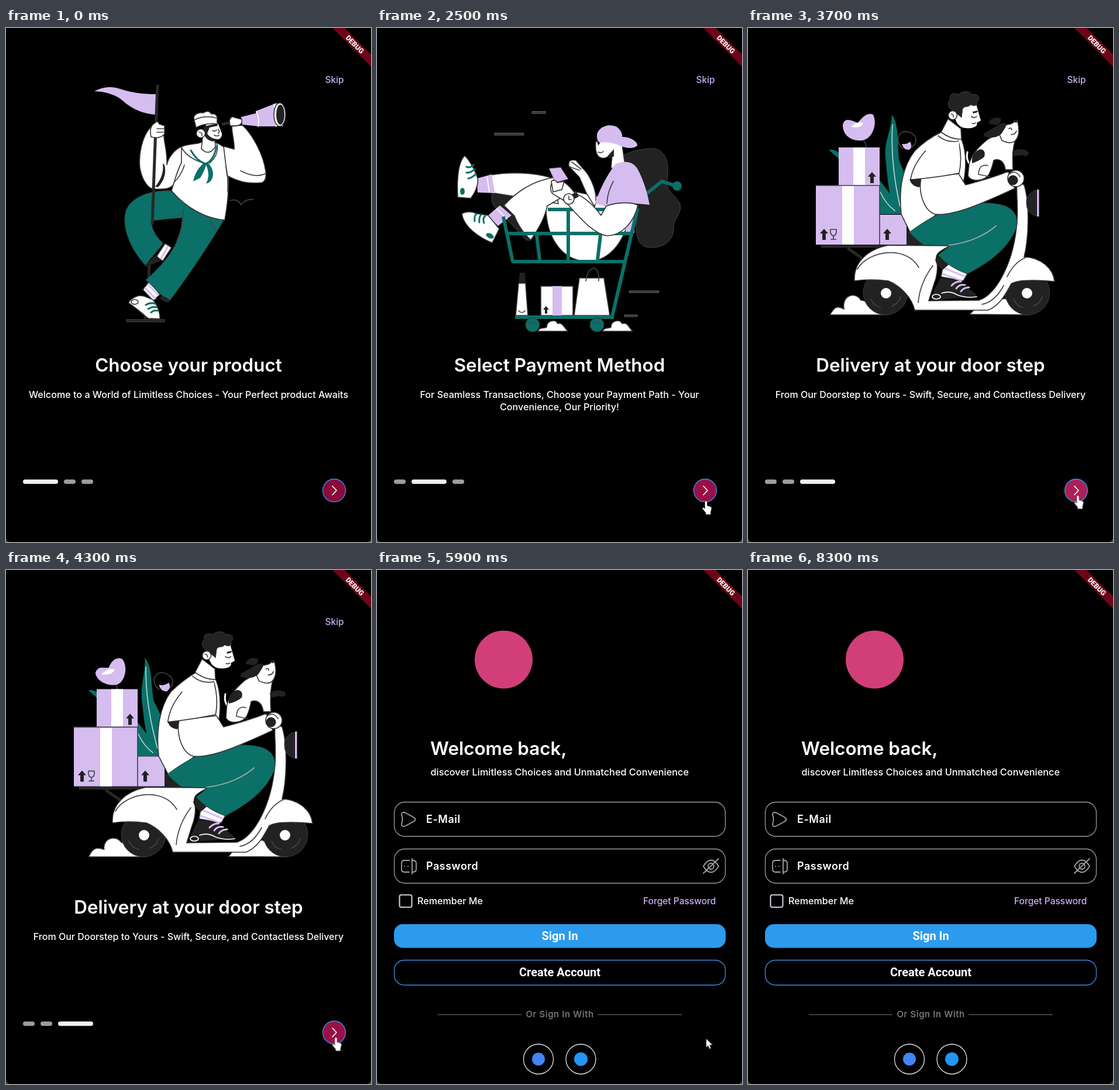
Recreate the animation shown at these times as an HTML page. Size 624 by 878 pixels, loop 8400 ms.

```html
<!DOCTYPE html>
<html lang="en">
<head>
<meta charset="utf-8">
<title>Shop onboarding</title>
<style>
html, body { margin: 0; height: 100%; overflow: hidden; background: #3a3a3a; }
svg { display: block; width: 624px; height: 878px; font-family: Inter, "Open Sans", sans-serif; }
text { fill: #fff; font-size: 16.15px; font-weight: 500; }
.mid { text-anchor: middle; }
.head { font-size: 31.4px; font-weight: 600; }
.roboto { font: 700 20px Roboto, sans-serif; }
.field { font-size: 18px; font-weight: 600; letter-spacing: .5px; }
.link { fill: #ccb0f4; font-size: 15.5px; }
.w { fill: #fff; stroke: #333; stroke-width: 1.6; }
.t { fill: #0a7068; }
.p { fill: #d6bdf0; }
.k { fill: #222; }
.l, .tl, .pl, .wl { fill: none; stroke: #444; stroke-width: 1.7; stroke-linecap: round; stroke-linejoin: round; }
.tl { stroke: #0a7068; stroke-width: 3; }
.pl { stroke: #d6bdf0; stroke-width: 3; }
.wl { stroke: #fff; }
.pole { stroke: #282828; stroke-width: 5; }
.frame { stroke: #0a7068; stroke-width: 6; fill: none; stroke-linejoin: round; }
.box { fill: none; stroke: #9b9b9b; stroke-width: 1.3; }
.icon { fill: none; stroke: #a2a2a2; stroke-width: 1.8; stroke-linecap: round; stroke-linejoin: round; }
.dot { fill: #9e9e9e; }
.on { fill: #f3f0f3; }

.scene, .hand, .arrow, .next { animation: 8.4s linear infinite; }
.scene { animation-timing-function: step-end; }
#find { animation-name: find; }
#pay { animation-name: pay; }
#ride { animation-name: ride; }
#tour { animation-name: tour; }
#login { animation-name: login; }
.hand { animation-name: hand; }
.arrow { animation-name: arrow; }
.next { fill: #8b0a3b; stroke: #2f96f0; stroke-width: 1.3; animation-name: press; }
@keyframes find { 0% { visibility: visible } 25%, 100% { visibility: hidden } }
@keyframes pay { 0% { visibility: hidden } 25% { visibility: visible } 41.667%, 100% { visibility: hidden } }
@keyframes ride { 0% { visibility: hidden } 41.667% { visibility: visible } 67.857%, 100% { visibility: hidden } }
@keyframes tour { 0% { visibility: visible } 67.857%, 100% { visibility: hidden } }
@keyframes login { 0% { visibility: hidden } 67.857%, 100% { visibility: visible } }
@keyframes hand {
  0%, 13% { transform: translate(630px, 798px) }
  17%, 22% { transform: translate(565px, 801.5px) }
  27%, 37% { transform: translate(556px, 808px) }
  41%, 100% { transform: translate(557.5px, 798.5px) }
}
@keyframes arrow {
  0%, 77% { transform: translate(562.5px, 800.5px) }
  82%, 100% { transform: translate(630px, 790px) }
}
@keyframes press {
  0%, 15% { fill: #8b0a3b }
  17%, 24% { fill: #9a1046 }
  25% { fill: #ab2058 }
  29%, 40.5% { fill: #9a1046 }
  42%, 45% { fill: #a92055 }
  49%, 100% { fill: #9a1046 }
}
</style>
</head>
<body>
<svg viewBox="0 0 624 878">
<rect y="-20" width="624" height="898" rx="8"/>

<g id="find" class="scene" data-at="0" data-half="1500">
  <path class="k" stroke="#4a4a4a" d="M206 498H271V502H206Z"/>
  <path class="pole" d="M238 470V498M245 400L244 436"/>
  <path class="p" d="M151 108C166 100 180 99 195 104C215 111 235 113 257 113L257 148C235 147 218 139 204 128C190 114 172 109 151 108Z" data-to="M147 127C166 122 185 121 205 119C225 118 245 114 265 110L265 149C245 146 225 140 205 136C186 133 165 130 147 127Z"/>
  <path class="l" d="M383 295Q395 290 402 302Q408 292 423 293" data-to="M340 295Q345 290 350 302Q355 292 360 293"/>
  <path class="w" d="M257 391L272 368L283 375L268 398Z" data-to="M260 394L275 371L286 379L272 401Z"/>
  <path class="pl" d="M265 393L277 373" data-to="M268 396L280 376"/>
  <path class="k" d="M236 405L257 388L266 397Q250 404 240 408Z" data-to="M246 407L261 391L271 400Q263 403 250 410Z"/>
  <path class="w" d="M234 447L245 433L263 455L252 466Z"/>
  <path class="pl" d="M238 444L255 462M243 438L260 456"/>
  <path class="w" d="M228 457C218 459 209 467 210 470C222 478 236 490 243 496L263 497C264 487 258 472 251 464L236 458Z"/>
  <ellipse class="l" cx="220" cy="468" rx="6" ry="4"/>
  <path class="tl" d="M239 473Q247 468 255 471M243 480Q250 475 257 477M248 486Q253 481 259 483"/>
  <path class="t" stroke="#333" d="M283 278C245 276 213 290 205 312C196 342 216 382 238 405L269 368C255 355 247 340 250 329L301 324C302 362 275 400 239 430L278 468C300 440 345 375 373 327Z" data-to="M290 279C250 279 215 291 208 315C200 345 227 382 248 408L275 371C258 355 252 342 257 330L311 328C310 365 285 400 245 436L290 469C312 435 350 375 386 330Z"/>
  <path class="k" d="M262 460Q270 455 280 465L277 469Q268 468 262 460Z" data-to="M262 460Q276 454 290 464L288 470Q274 468 262 460Z"/>
  <path class="l" d="M303 311Q303 340 292 364M350 326Q352 340 359 346" data-to="M311 316Q312 343 300 367M359 328Q361 342 368 349"/>
  <g data-move="7.5 .8">
    <path class="pole" d="M259 97L250 336"/>
    <path class="w" d="M300 203C288 207 277 222 275 234C276 210 270 195 270 184L247 170C233 185 226 215 229 240C233 262 245 276 254 275C270 276 283 276 291 262L309 232Z"/>
    <path class="pole" d="M256 170L252 278"/>
    <path class="w" d="M248 186Q244 167 255 162Q259 157 262 164L271 167V181Q264 190 248 186Z"/>
    <path class="l" d="M258 172H270M258 178H269"/>
    <path class="k" d="M271 234Q276 254 260 272L255 271Q271 252 268 231Z"/>
    <path class="w" d="M300 203C315 196 330 200 338 193L360 196C375 203 383 213 388 215L379 240C383 270 379 300 374 328C345 326 310 310 283 278C288 262 292 245 300 230Z"/>
    <path class="l" d="M305 234Q300 251 287 264M300 204Q310 222 336 230M360 196Q366 215 348 231"/>
  </g>
  <path class="w" d="M372 202L390 207C391 195 386 180 386 168L404 166C420 180 440 215 444 245Q446 260 438 264C415 267 395 262 378 252Z" data-to="M379 203L398 210C396 195 385 185 370 172L384 165C400 175 428 205 436 240Q440 258 428 263C410 266 395 262 385 252Z"/>
  <path class="l" d="M443 249Q427 257 401 244M376 236Q380 255 379 280" data-to="M436 245Q420 256 398 244M383 238Q388 255 386 282"/>
  <g data-move="8 1.5">
    <path class="w" d="M337 180L334 206Q346 220 358 203L357 190Z"/>
    <path fill="#fff" d="M342 164L362 162L369 180Q370 191 354 193L340 190Z"/>
    <path class="k" d="M338 168L361 163L362 167L348 170L344 180Q349 190 366 190Q360 195 350 193Q340 189 338 179Z"/>
    <circle class="w" cx="333" cy="180" r="7.5"/>
    <path class="l" d="M330 178Q336 178 335 184M353 175Q357 178 360 174M363 173Q366 177 363 180M356 183Q360 186 364 183"/>
    <path class="w" d="M322 158C318 147 330 144 337 145Q347 139 351 147C357 145 362 150 361 156L361 164Q342 161 325 170Z"/>
    <path class="l" d="M322 157Q340 148 361 154"/>
    <path class="tl" d="M316 209Q326 227 341 232Q355 227 360 202"/>
    <path class="t" d="M338 231C328 239 322 251 320 262L332 256Q339 245 342 234Q350 251 342 266Q354 263 354 248Q353 238 345 230Z"/>
  </g>
  <path class="pole" stroke-linecap="round" d="M371 164L404 158" data-to="M371 167L384 161"/>
  <path class="p" d="M402 152L430 145L432 168L404 165Z" data-to="M378 159L390 145L404 158L388 168Z"/>
  <path class="p" d="M427 142L463 128L474 168L430 168Z" data-to="M390 143L414 122L436 157L399 166Z"/>
  <path class="wl" d="M428 143Q434 156 431 168M458 130Q464 148 462 168" data-to="M391 143Q402 151 404 164M408 124Q414 150 427 162"/>
  <path class="w" d="M458 148a10 20 0 1 0 20 0a10 20 0 1 0 -20 0" data-to="M411 138a18 21 0 1 0 36 0a18 21 0 1 0 -36 0"/>
  <path class="k" d="M462 148a7 17 0 1 0 14 0a7 17 0 1 0 -14 0" data-to="M414 138a14.500 17 0 1 0 29 0a14.500 17 0 1 0 -29 0"/>
  <path class="w" d="M382 158Q385 149 391 153L403 156Q405 166 393 167L383 167Z" data-to="M370 172Q372 161 377 163L387 167Q389 174 383 176L372 176Z"/>
  <text class="mid head" x="312" y="587">Choose your product</text>
  <text class="mid" x="312" y="632">Welcome to a World of Limitless Choices - Your Perfect product Awaits</text>
</g>

<g id="pay" class="scene" data-at="2500" data-half="700">
  <g fill="#333" stroke="#777" stroke-width=".8">
    <path d="M265 142.500H288V146H265ZM201 179.500H251V183H201Z" data-to="M285 142.500H308V146H285ZM215 179.500H265V183H215Z"/>
    <path d="M431 449H482V452H431ZM423 490H445V493H423Z" data-to="M445 449H496V452H445ZM433 490H455V493H433Z"/>
  </g>
  <path class="k" stroke="#444" d="M408 230C420 215 440 206 475 206C495 210 500 235 496 258C490 275 510 285 518 300C522 320 505 325 507 345C505 370 480 378 460 374C445 370 440 350 445 320L430 250Z" data-to="M408 230C420 214 442 208 477 209C497 213 499 237 498 260C493 277 512 287 519 304C522 322 507 328 505 348C502 372 480 377 460 373C445 369 441 350 445 320L430 250Z"/>
  <path class="frame" d="M452 290L487 262L513 270"/>
  <circle class="t" cx="513" cy="270" r="8"/>
  <path class="k" stroke="#444" d="M197 282L240 285L270 345Q268 367 255 362C242 350 232 335 205 310Q193 300 197 282Z"/>
  <path class="w" d="M289 310C290 350 310 397 360 399C400 398 428 360 432 310L390 290 290 270Z"/>
  <path class="w" d="M195 251C230 245 270 247 302 257L310 300L250 290L200 282Z"/>
  <path class="w" d="M217 303C240 278 270 260 304 255L318 288L291 304C287 325 275 345 263 362C248 348 240 334 235 321Z"/>
  <path class="p" d="M171 257L196 250L201 282L172 281ZM189 321L210 303L230 320L207 338Z"/>
  <path class="wl" stroke-width="3" d="M188 254L192 280M205 309L222 326"/>
  <path class="w" d="M150 218C141 227 136 250 138 289L160 291C169 280 174 265 172 256Q162 230 150 218Z"/>
  <path class="w" d="M145 317Q158 311 170 317L190 320L209 343L197 367C175 358 148 340 145 317Z"/>
  <path class="tl" d="M153 237Q158 240 165 234M153 247Q160 248 167 241M156 257Q163 256 169 249M167 330Q166 320 170 318M175 332Q174 323 178 319M183 333Q180 325 185 321"/>
  <ellipse class="t" cx="146" cy="279" rx="4" ry="6"/>
  <ellipse class="t" cx="193" cy="355" rx="7" ry="4" transform="rotate(25 193 355)"/>
  <path class="k" d="M244 418H253L254 438H242Z"/>
  <path class="w" d="M242 436H254L258 491H237ZM280 441H335V491H280ZM346 427H388L398 491H337Z"/>
  <path class="p" d="M300 441H316V491H300ZM425 335L440 310V350H425Z"/>
  <path class="k" d="M289 475L294 481H291V488H287V481H284Z"/>
  <path class="l" d="M357 432Q360 411 371 410Q380 412 379 432M242 483Q248 489 253 483"/>
  <path class="frame" d="M292 310H445L402 493M221 351H438M216 322L232 399H422M236 494H405M327 312V396M273 354L278 396M382 354L377 396"/>
  <path class="w" d="M275 518C278 510 286 514 290 511C290 500 305 496 309 505C316 502 320 511 326 518Z" data-to="M275 518C278 512 286 512 290 506C293 498 304 500 310 510C317 506 322 513 328 518Z"/>
  <path class="w" d="M385 518C390 510 396 514 400 511C400 500 415 496 419 505C428 502 430 511 437 518Z" data-to="M385 518C390 512 396 512 400 506C403 498 414 500 420 510C427 506 432 513 438 518Z"/>
  <g class="t" stroke="#333"><circle cx="266" cy="507" r="12"/><circle cx="376" cy="507" r="12"/></g>
  <path class="l" d="M260 506Q266 498 272 506M370 506Q376 498 382 506"/>
  <path class="w" d="M372 305C380 285 365 252 352 240L340 226Q326 223 328 236L346 255L358 282Z"/>
  <path class="l" d="M333 229L349 241M329 237L346 243"/>
  <path class="w" d="M374 194C372 215 378 224 390 222L402 217L400 240L424 234L418 192Z"/>
  <path class="p" d="M408 232C425 226 437 228 445 240C455 258 462 280 466 302C440 300 415 295 392 305L372 300C380 280 390 255 408 232Z"/>
  <path class="k" d="M394 219L405 207V219L398 223ZM374 185L384 184L383 194L378 201Z"/>
  <path class="p" d="M376 184C376 171 395 161 410 169C417 174 420 182 419 186C433 186 446 194 445 201Q435 209 415 201Q397 193 381 196Q376 193 376 184Z"/>
  <path class="w" d="M392 304C415 296 440 298 446 303C440 330 420 354 393 355C365 350 340 315 320 295L300 283C294 275 297 263 304 260C315 256 330 270 338 282C355 289 370 302 383 320Z"/>
  <path class="p" stroke="#555" d="M294 240L314 238L327 258L305 264Z"/>
  <path class="w" d="M298 262Q304 257 308 264L320 262 316 276 301 280Z"/>
  <path stroke="#222" stroke-width="9" d="M320 296L343 284"/>
  <circle class="w" cx="328" cy="292" r="9"/>
  <path class="l" d="M328 287V293H332M404 262Q394 280 393 300M378 212Q384 214 387 211"/>
  <text class="mid head" x="312" y="587">Select Payment Method</text>
  <text class="mid" x="312" y="632">For Seamless Transactions, Choose your Payment Path - Your</text>
  <text class="mid" x="312" y="653">Convenience, Our Priority!</text>
</g>

<g id="ride" class="scene" data-at="3700" data-half="1300">
  <path class="w" d="M140 490C148 476 152 474 164 480C160 455 185 450 193 465C205 465 212 480 240 490Z" data-to="M143 490C147 476 155 470 172 474C173 460 192 454 203 466C212 466 218 480 240 490Z"/>
  <path class="w" d="M379 489C395 472 410 466 440 462L480 490Z" data-to="M382 490C392 470 410 458 436 460L480 490Z"/>
  <path class="t" d="M246 148C258 165 255 190 258 225L272 260V317C240 310 240 270 236 230C230 195 245 180 246 148Z" data-to="M226 152C240 165 238 195 245 220L268 260V317C240 310 235 270 230 235C224 200 232 180 226 152Z"/>
  <path class="wl" opacity=".7" d="M247 165Q243 230 260 305" data-to="M229 167Q232 230 258 305"/>
  <path class="t" d="M225 260C240 280 255 297 266 318H225Z"/>
  <path class="wl" opacity=".7" d="M226 280Q235 300 251 312"/>
  <path class="l" d="M265 206C250 195 256 175 272 177C290 181 292 198 278 204" data-to="M258 202C244 192 248 173 263 173C281 177 288 191 278 201"/>
  <path class="p" d="M263 198Q273 199 277 194Q282 203 276 208Q266 209 263 198Z" data-to="M259 194Q270 197 280 190Q284 200 274 207Q263 206 259 194Z"/>
  <path class="t" d="M138 208Q148 207 155 213V223Z" data-to="M144 202Q150 200 155 203V212Z"/>
  <path class="l" d="M194 188Q203 197 202 204" data-to="M170 194Q175 200 175 204"/>
  <path class="p" d="M162 166C165 150 180 160 188 162C200 146 208 145 214 148C222 165 212 190 195 192C175 194 162 182 162 166Z" data-to="M141 190C145 176 158 181 160 172C158 160 170 152 180 158C192 165 194 190 185 200C180 206 150 206 141 190Z"/>
  <path fill="#fff" d="M176 169Q189 157 197 163Q194 172 176 169Z" data-to="M146 191Q155 178 171 178Q170 190 146 191Z"/>
  <g data-move="0 -1.200">
    <path class="p" d="M155 204H225V269H155ZM116 269H225V370H116ZM225 319H271V370H225Z"/>
    <path fill="#fff" d="M180 204H200V268H180ZM161 270H181V370H161Z"/>
    <path class="l" d="M116 269H225V370M225 319V370M141 344H151Q152 354 146 355Q140 354 141 344ZM146 355V361M142 361H150"/>
    <path class="k" d="M212 246L219 254H215V265H209V254H205ZM130 343L137 351H133V362H127V351H123ZM238 343L245 351H241V362H235V351H231Z"/>
    <path class="pole" d="M125 373H345M170 376L196 394"/>
  </g>
  <g class="k" stroke="#3a3a3a"><circle cx="235" cy="452" r="38"/><circle cx="478" cy="452" r="38"/></g>
  <path class="l" d="M210 463Q216 476 227 477M246 475Q258 470 261 459M454 463Q460 476 470 477M488 475Q500 470 503 459"/>
  <path class="w" d="M182 432C180 400 205 378 240 371L345 372C330 380 320 385 322 395C326 410 322 428 318 437L309 466L395 465C425 455 455 400 460 330C462 300 458 280 460 262L472 268C482 300 480 360 472 391C500 392 522 410 524 433C490 430 460 430 450 437C440 455 430 475 410 482H285C280 460 260 440 240 432Q210 428 182 432Z"/>
  <path class="l" d="M187 412C205 380 270 370 292 409M316 406Q294 435 291 469M437 440Q422 468 400 472M475 392Q455 400 443 425"/>
  <g fill="#fff"><circle cx="236" cy="453" r="9"/><circle cx="477" cy="453" r="9"/></g>
  <path class="k" stroke="#444" d="M492 277Q474 285 476 300Q476 315 492 321Z"/>
  <path class="p" d="M494 276H497.500V322H494Z"/>
  <path class="w" d="M333 408L345 398L375 420L368 432L330 425Z"/>
  <path class="pl" d="M338 411L369 424M333 420L364 431"/>
  <path class="k" d="M320 396Q324 385 340 388L348 400L333 413Q322 406 320 396Z"/>
  <path class="k" d="M329 427L360 431C370 445 388 448 392 459L312 465Q318 445 329 427Z"/>
  <path class="wl" d="M331 453Q345 448 358 456Q375 462 391 459"/>
  <path class="pl" d="M348 440Q355 432 364 433M356 445Q362 437 371 439M364 450Q369 443 378 443"/>
  <ellipse class="l" cx="322" cy="459" rx="7" ry="4" style="stroke:#fff"/>
  <path class="w" d="M330 178L365 190C375 215 376 260 355 300L320 320L280 355L262 318C258 280 262 240 285 210Q305 190 330 178Z" data-to="M316 172L351 184C362 210 362 260 345 300L320 320L280 354L260 318C255 280 258 235 278 205Q298 187 316 172Z"/>
  <path class="t" stroke="#333" d="M272 352C300 330 325 318 340 310C370 300 410 294 440 304C460 312 465 332 455 350C440 380 410 402 375 420Q345 410 325 388L345 372L290 370Z"/>
  <path class="k" d="M271 343Q285 360 300 370H271Z"/>
  <path class="l" d="M343 371C380 367 408 352 424 338" style="stroke:#aaa"/>
  <path class="k" d="M276 258L302 256L293 272Q280 271 276 258Z"/>
  <path class="w" d="M296 256C291 280 300 312 320 318C350 322 400 300 456 274L445 245C420 255 395 262 372 268L360 249Z"/>
  <path class="w" d="M308 205Q282 232 278 259Q320 256 361 248Q367 220 359 190Z" data-to="M302 201Q278 228 275 260Q315 255 355 246Q360 215 348 183Z"/>
  <path fill="#fff" d="M302 205L332 180L361 191L359 238L320 243Z" data-to="M296 201L318 174L348 184L352 238L312 243Z"/>
  <path class="l" d="M325 184Q340 197 360 193" data-to="M311 178Q328 192 348 188"/>
  <g data-move="-15.500 -7">
    <path class="w" d="M342 155L330 178Q348 191 365 190L364 172Z"/>
    <path fill="#fff" d="M352 138C352 163 362 173 380 171C390 170 393 165 391 162L398 158L390 130L360 128Z"/>
    <path class="k" stroke="#444" d="M350 141C339 134 342 124 346 122C343 112 354 110 360 114C366 106 381 108 382 114C394 111 398 121 391 126C393 134 385 134 381 131C375 137 371 132 367 138L365 153L358 147Z"/>
    <circle class="w" cx="350" cy="149" r="7.500"/>
    <path class="k" d="M384 143L393 141L392 144L385 146Z"/>
    <path class="l" d="M382 151Q387 155 391 151M383 163Q387 164 389 162M347 147Q352 147 351 152"/>
  </g>
  <path class="wl" style="stroke-width:3" d="M375 212Q372 226 381 235"/>
  <path class="w" d="M378 232C384 212 398 200 410 190L432 178L459 186C452 202 452 222 453 242L440 242C438 228 430 222 420 226Q417 240 412 250C405 262 380 264 376 252Z" data-to="M377 230C382 209 395 197 407 186L428 173L456 181C450 198 451 221 453 242L440 242C438 226 429 219 418 223Q416 238 411 249C404 262 380 264 376 252Z"/>
  <path class="k" d="M383 231Q381 213 397 207Q407 208 404 220Q396 227 383 231ZM452 211Q468 202 480 212Q479 222 469 217L453 219Z" data-to="M379 225Q376 209 392 202Q405 203 402 215Q393 223 379 225ZM450 209Q463 200 476 207Q476 218 466 213L452 217Z"/>
  <path class="l" d="M410 235Q395 231 394 250L413 254"/>
  <g data-move="-4 -6">
    <path class="w" d="M428 177C437 160 451 168 455 160Q459 154 461 160Q465 178 461 186Q455 202 434 192Z"/>
    <path class="k" d="M403 180Q420 171 432 163Q445 160 440 170L433 181Q421 191 403 185ZM411 163Q416 150 432 154Q435 161 425 166ZM452 160Q457 154 461 158L459 162Z"/>
    <path class="l" d="M446 172Q450 169 451 174M450 182Q457 182 459 176"/>
  </g>
  <circle class="w" cx="458" cy="257" r="14"/>
  <circle class="k" cx="453" cy="260" r="8.500"/>
  <path class="l" d="M446 250Q457 241 465 254"/>
  <text class="mid head" x="312" y="587">Delivery at your door step</text>
  <text class="mid" x="312" y="632" style="font-size:16px">From Our Doorstep to Yours - Swift, Secure, and Contactless Delivery</text>
</g>

<g id="tour" class="scene">
  <text class="link" x="545.500" y="94">Skip</text>
  <circle class="next" cx="561" cy="790" r="19.500"/>
  <path class="wl" d="M558 782.500L565 790L558 797.500"/>
  <path class="hand" fill="#fff" stroke="#000" stroke-width=".4" d="M4.500 2a2 2 0 0 1 4 0v6l5.500 1.500q2.500 1 2 3.500l-1.500 6v4H6v-3L1 14q-1.500-2.500 1-3l2.500 2z"/>
</g>

<g id="login" class="scene">
  <circle cx="216.500" cy="153" r="49.500" fill="#d23f78"/>
  <text class="head" x="91" y="316">Welcome back,</text>
  <text x="91.500" y="351" style="font-size:16.3px">discover Limitless Choices and Unmatched Convenience</text>
  <g class="box">
    <rect x="29.500" y="396.500" width="566" height="58.500" rx="18"/>
    <rect x="29.500" y="476.500" width="566" height="58.500" rx="18"/>
    <rect x="29.500" y="666.500" width="566" height="42.500" rx="17" stroke="#3f8be0"/>
    <rect x="38.500" y="555" width="21" height="21" rx="3" stroke="#c9c4d3" stroke-width="2.200"/>
    <path d="M104 759.500H247M377 759.500H521" stroke="#555"/>
    <circle cx="276" cy="835.500" r="25.500" stroke="#e4e4e4"/>
    <circle cx="348.500" cy="835.500" r="25.500" stroke="#e4e4e4"/>
  </g>
  <g class="icon">
    <path d="M42 418Q42 412 49 415L62 422Q69 426 62 430L49 437Q42 440 42 434Q45 426 42 418Z"/>
    <path d="M55 496H47Q42 496 42 501V511Q42 516 47 516H55M60 493V519M61 496Q67 496 67 501V511Q67 516 61 516M47 506H47.100M53 506H53.100"/>
    <path d="M558 506Q571 485 584 506Q571 527 558 506ZM558 518L584 493"/>
    <circle cx="571" cy="506" r="5"/>
  </g>
  <text class="field" x="84" y="432">E-Mail</text>
  <text class="field" x="84" y="512">Password</text>
  <text x="69" y="571">Remember Me</text>
  <text class="link" x="455" y="571">Forget Password</text>
  <rect x="29" y="605" width="567" height="40.500" rx="15" fill="#2c9aed"/>
  <text class="mid roboto" x="312.500" y="632">Sign In</text>
  <text class="mid roboto" x="312.500" y="694">Create Account</text>
  <text class="mid" x="312.500" y="764" style="fill:#858585;font-size:15px;letter-spacing:.6px">Or Sign In With</text>
  <circle cx="276" cy="835.500" r="11" fill="#4285f4"/>
  <circle cx="348.500" cy="835.500" r="11.500" fill="#2196f3"/>
  <path class="arrow" fill="#fff" d="M0 0v15l3.500-3.300 2.400 5.300 2.300-1-2.400-5.200h5z"/>
</g>

<path d="M558 0H579L624 45V66Z" fill="#6d0417"/>
<text class="mid" transform="translate(596.500 28) rotate(45)" y="4.300" style="font:900 12px Roboto,sans-serif">DEBUG</text>
</svg>
<script>
const NS = 'http://www.w3.org/2000/svg', LOOP = 8400;
const number = /-?\d*\.?\d+/g;
const numbers = text => text.match(number).map(Number);
const mix = (a, b, k) => +(a + (b - a) * k).toFixed(2);

// Page dots: the active one is three times as wide.
['find', 'pay', 'ride'].forEach((id, active) => {
  let x = 29;
  for (let i = 0; i < 3; i++) {
    const width = i === active ? 60 : 20, dot = document.createElementNS(NS, 'rect');
    Object.entries({ x, y: 771.3, width, height: 7.4, rx: 3.7, class: i === active ? 'on' : 'dot' })
      .forEach(([name, value]) => dot.setAttribute(name, value));
    document.getElementById(id).append(dot);
    x += width + 10;
  }
});

const scenes = [...document.querySelectorAll('[data-at]')].map(scene => ({
  at: +scene.dataset.at,
  half: +scene.dataset.half,
  morphs: [...scene.querySelectorAll('[data-to]')].map(path => {
    const d = path.getAttribute('d');
    return { path, d, from: numbers(d), to: numbers(path.dataset.to) };
  }),
  moves: [...scene.querySelectorAll('[data-move]')].map(group => ({ group, by: numbers(group.dataset.move) }))
}));

function pose({ at, half, morphs, moves }, time) {
  const k = (1 - Math.cos(Math.PI * (time - at) / half)) / 2;
  for (const { path, d, from, to } of morphs) {
    let i = 0;
    path.setAttribute('d', d.replace(number, () => ' ' + mix(from[i], to[i++], k)));
  }
  for (const { group, by } of moves) group.setAttribute('transform', `translate(${by[0] * k} ${by[1] * k})`);
}

let start;
function draw(now) {
  start ??= now;
  const time = (now - start) % LOOP;
  scenes.forEach(scene => pose(scene, time));
  requestAnimationFrame(draw);
}
requestAnimationFrame(draw);
</script>
</body>
</html>
```
